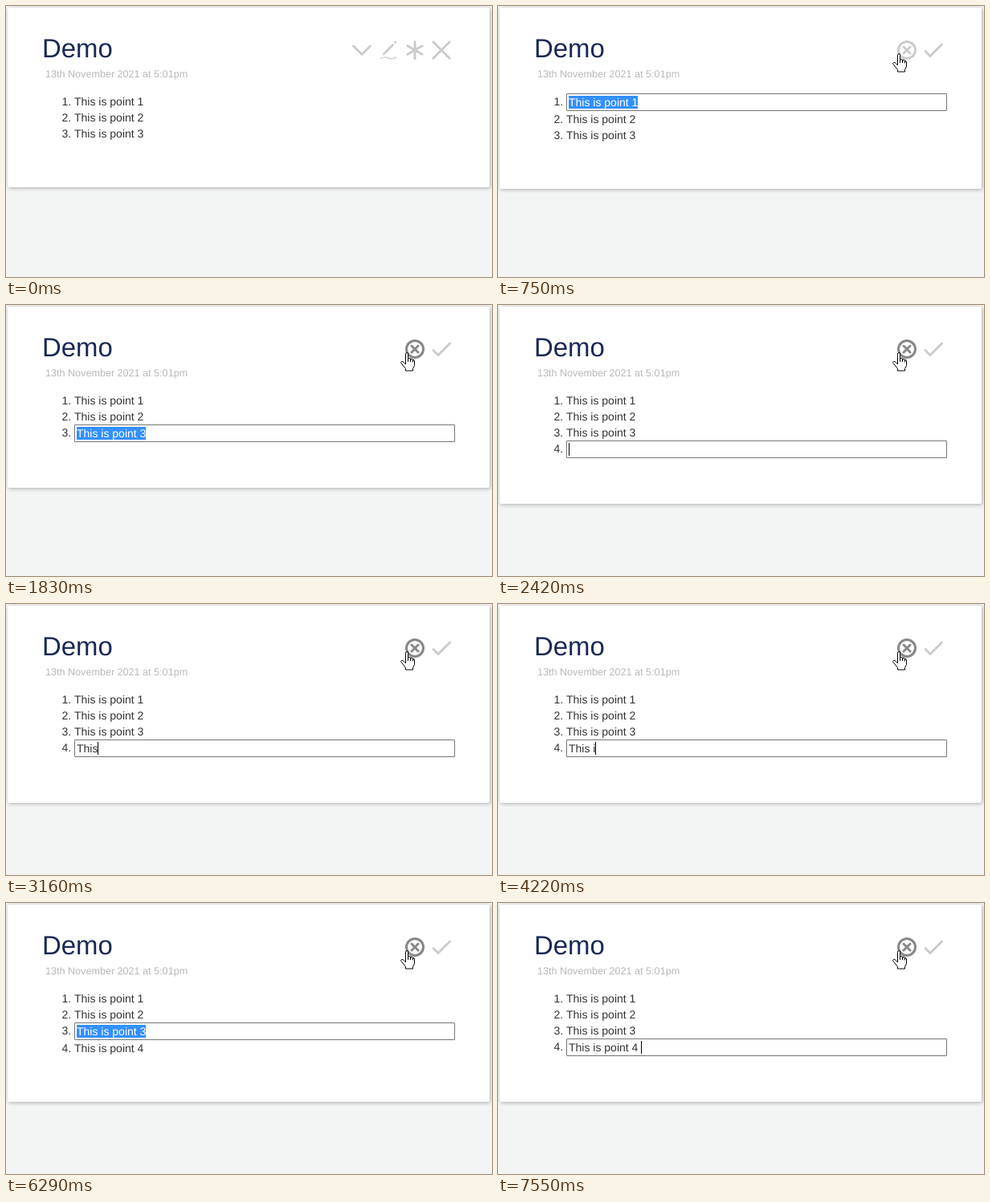
Animation, 605 px wide and 338 px high, one loop 8 s. Source, as an HTML page:

```html
<!DOCTYPE html>
<html lang="en">
<head>
<meta charset="utf-8">
<title>Editable list</title>
<style>
html, body { margin: 0; width: 100%; height: 100%; overflow: hidden; background: #f3f4f4; }
body { position: relative; font: 14px/20px Arial, "Liberation Sans", sans-serif; color: #333; text-rendering: geometricPrecision; }
#card { position: absolute; left: 2px; top: 2px; width: 600px; background: #fff; border-radius: 2px; box-shadow: 1px 1px 5px rgba(0, 0, 0, .3); }
h1, p, ol, svg { position: absolute; margin: 0; padding: 0; white-space: pre; }
h1 { left: 45px; top: 34px; font-size: 32.9px; font-weight: 400; line-height: 37px; color: #182955; }
p { left: 49px; top: 75px; font-size: 12.6px; color: #b8b8b8; }
ol { left: 85px; top: 109px; width: 474px; list-style: none; }
li { position: relative; height: 20px; }
li::before { content: attr(data-n) ". "; position: absolute; right: 100%; }
li.edit { height: 22px; }
.edit div { position: absolute; box-sizing: border-box; width: 474px; height: 22px; padding-left: 2px; border: 1px solid #767676; border-radius: 1px; background: #fff; }
.sel { background: #3390ff; color: #fff; }
.caret { position: absolute; top: 2px; width: 1px; height: 16px; background: #000; }
svg { left: 0; top: 0; }
</style>
</head>
<body>
<div id="card"></div>
<h1>Demo</h1>
<p>13th November 2021 at 5:01pm</p>
<ol id="list"></ol>
<svg width="605" height="338" fill="none" stroke="#ccc" stroke-width="3" stroke-linecap="round" stroke-linejoin="round">
  <g id="viewTools">
    <path d="M432.5 50L443 60.3L453.5 50"/>
    <path d="M471.8 58.2L482.3 47.7M483.8 46.2L485.5 44.5" stroke-linecap="butt"/>
    <path d="M469 61L470.3 57.5L472.5 59.7Z" fill="#ccc" stroke-width=".5"/>
    <path d="M466.5 65.5C470 63.3 473 63.5 476 65S482 66.3 486 63.8" stroke-width="1.4"/>
    <path id="star" d="M509 44.5V65.5M499.9 49.75L518.1 60.25M499.9 60.25L518.1 49.75"/>
    <path d="M531.8 44.8L552.2 65.2M552.2 44.8L531.8 65.2"/>
  </g>
  <g id="editTools">
    <g id="cancel">
      <circle cx="509" cy="55" r="10.5"/>
      <path d="M505 51L513 59M513 51L505 59"/>
    </g>
    <path d="M532 56.5L538 62.5L552.5 48"/>
  </g>
  <g fill="#fff" stroke="#000" stroke-width="1">
    <path id="arrow" d="M.5.5V16.5L4.3 12.9L7 18.7L9.4 17.6L6.8 12H12Z"/>
    <path id="hand" d="M497.5 73.5V61.2Q497.5 59.5 499 59.5T500.5 61.2V66.5Q503.5 65.5 503.5 67.5Q506.300 66.500 506.500 68.500Q508.500 68 508.500 70V75.500L506.500 79.500V82H497.500V79.500L492 72.500Q491 71 492.400 70.500Q494 70 495.300 71.500ZM500.500 66.500V70.500M503.500 67.500V70.500M506.500 68.500V71"/>
  </g>
</svg>
<script>
const $ = id => document.getElementById(id);
const LOOP = 8000, EDIT = 750, ADD = 2420;
const focus = [[0, 0], [EDIT, 1], [1760, 2], [1830, 3], [ADD, 4], [6290, 3], [6690, 4]];
// time, length of the typed text; one space is removed and typed again
const typed = [[ADD, 0], [2960, 1], [3030, 2], [3090, 3], [3160, 4], [3430, 5], [3960, 4], [4030, 5],
  [4220, 6], [4290, 7], [4360, 8], [4630, 9], [4700, 10], [4760, 11],
  [4900, 12], [4970, 13], [5090, 14], [5690, 15], [7550, 16]];
const caretOff = [[3890, 3960], [5620, 5690], [7490, 7550]];
const last = (table, t) => table.reduce((v, [at, x]) => t >= at ? x : v, 0);
const show = (id, on) => $(id).style.display = on ? "" : "none";
const grey = v => `rgb(${v},${v},${v})`;
let shown = "";

function listHtml(t) {
  const row = last(focus, t), selected = t < ADD || t >= 6290 && t < 6960;
  const caret = !selected && !caretOff.some(([a, b]) => t >= a && t < b);
  const items = [1, 2, 3].map(n => "This is point " + n);
  if (t >= ADD) items.push("This is point 4 ".slice(0, last(typed, t)));
  return items.map((text, i) => i + 1 === row
    ? `<li class="edit" data-n="${row}"><div><span class="${selected ? "sel" : ""}">${text}</span>${caret ? '<i class="caret"></i>' : ""}</div></li>`
    : `<li data-n="${i + 1}">${text}</li>`).join("");
}

function drawPointer(t) {
  const step = Math.min(6, Math.floor((t - 70) / 70));
  const left = (1 - step / 6) ** 2;
  show("arrow", step >= 0 && step < 5);
  show("hand", step >= 5);
  $("arrow").setAttribute("transform", `translate(${498 + 48 * left} ${59 + 263 * left})`);
  $("hand").setAttribute("transform", `translate(${48 * left} ${263 * left})`);
  $("star").style.stroke = grey(step < 5 ? 204 : step < 6 ? 170 : 136);
}

function draw() {
  const t = performance.now() % LOOP, editing = t >= EDIT;
  const html = listHtml(t);
  if (html !== shown) $("list").innerHTML = shown = html;
  $("card").style.height = (t < EDIT ? 224 : t < ADD ? 226 : 246) + "px";
  show("viewTools", !editing);
  show("editTools", editing);
  $("cancel").style.stroke = grey(204 - 68 * Math.min(1, Math.max(0, (t - EDIT) / 200)));
  drawPointer(t);
  requestAnimationFrame(draw);
}
draw();
</script>
</body>
</html>
```
